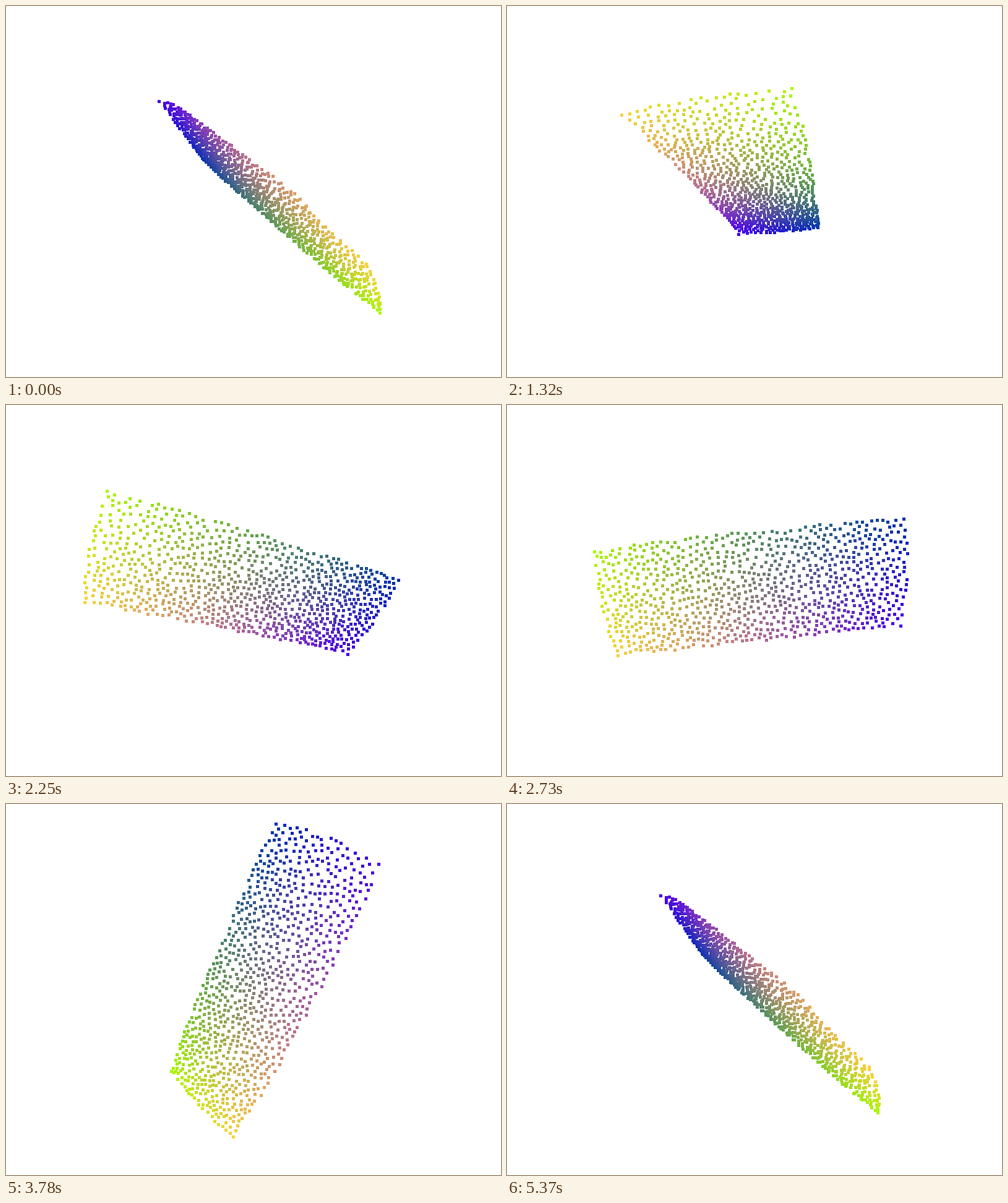
These frames come from a looping animation (800 by 600 pixels, 5400 ms). An HTML page with a canvas:

```html
<!DOCTYPE html>
<html lang="en">
<head>
<meta charset="utf-8">
<title>Turning point cloud</title>
<style>
  html, body { margin: 0; width: 100%; height: 100%; overflow: hidden; background: #fff; }
  canvas { display: block; }
</style>
</head>
<body>
<canvas id="stage" width="800" height="600"></canvas>
<script>
const ctx = document.getElementById('stage').getContext('2d');

const STEP = 30, STEPS = 180;      // 2 degrees every 30 ms
const COUNT = 900, GAP = 7.4, SIZE = 5;
const DIST = 565;                  // camera distance
const TILT = 47.3 * Math.PI / 180; // turning axis against the line of sight
const ROLL = 34.6 * Math.PI / 180; // turning axis within the picture
const HALF_LONG = 240, HALF_SHORT = 89;

// Directions of the sheet: long side, short side, normal
const LONG = [-0.774, -0.414, -0.479];
const SHORT = [-0.594, 0.728, 0.342];
const NORMAL = [0.207, 0.549, -0.809];

// Corner colours
const LIME = [172, 248, 4], YELLOW = [247, 210, 62];
const BLUE = [0, 48, 178], VIOLET = [70, 0, 236];

let seed = 20117;
function random() {
  seed = (seed + 0x6D2B79F5) | 0;
  let r = Math.imul(seed ^ (seed >>> 15), 1 | seed);
  r = (r + Math.imul(r ^ (r >>> 7), 61 | r)) ^ r;
  return ((r ^ (r >>> 14)) >>> 0) / 4294967296;
}

const mix = (p, q, k) => p + (q - p) * k;

function smooth(lo, hi, x) {
  const k = Math.min(1, Math.max(0, (x - lo) / (hi - lo)));
  return k * k * (3 - 2 * k);
}

// a runs along the long side, b along the short side, both from -1 to 1
function place(a, b) {
  const side = (1 + b) / 2;
  const s = a * (HALF_LONG + 10 * (1 - b * b));
  const t = b * (HALF_SHORT + 6.5 * (1 - a ** 4));
  const hump = 13 * (1 - a ** 8) * mix(0.35, 1, smooth(-0.75, -0.48, a));
  const lift = mix(-4 * (1 - a ** 4), hump, side);
  return LONG.map((d, i) => d * s + SHORT[i] * t + NORMAL[i] * lift);
}

function tint(a, b) {
  const along = (1 + a) / 2, side = (1 + b) / 2;
  const rgb = LIME.map((_, i) =>
    mix(mix(LIME[i], BLUE[i], along), mix(YELLOW[i], VIOLET[i], along), side));
  rgb[0] += 20 * (1 - a * a) * side;
  return `rgb(${rgb.map(Math.round).join(',')})`;
}

function scatter() {
  const spots = [[-1, -1], [-1, 1], [1, -1], [1, 1]];
  for (let tries = 0; spots.length < COUNT && tries < 40000; tries++) {
    const a = random() * 2 - 1, b = random() * 2 - 1;
    const free = spots.every(([c, d]) =>
      Math.hypot((a - c) * (HALF_LONG + 7), (b - d) * (HALF_SHORT + 5)) > GAP);
    if (free) spots.push([a, b]);
  }
  return spots.map(([a, b]) => ({ pos: place(a, b), color: tint(a, b) }));
}

const points = scatter();
const sinT = Math.sin(TILT), cosT = Math.cos(TILT);
const sinR = Math.sin(ROLL), cosR = Math.cos(ROLL);

function project({ pos: [x, y, z], color }, sin, cos) {
  const p = x * cos - y * sin;
  const turned = x * sin + y * cos;
  const q = z * sinT - turned * cosT;
  const near = z * cosT + turned * sinT;
  const scale = DIST / (DIST - near);
  return {
    color, near,
    x: 400 + scale * (p * cosR - q * sinR),
    y: 300 + scale * (p * sinR + q * cosR)
  };
}

function draw(time) {
  const step = Math.floor(time / STEP) % STEPS;
  const angle = step / STEPS * 2 * Math.PI;
  const sin = Math.sin(angle), cos = Math.cos(angle);
  ctx.fillStyle = '#fff';
  ctx.fillRect(0, 0, 800, 600);
  const dots = points.map(p => project(p, sin, cos)).sort((m, n) => m.near - n.near);
  for (const d of dots) {
    ctx.fillStyle = d.color;
    ctx.fillRect(Math.round(d.x - SIZE / 2), Math.round(d.y - SIZE / 2), SIZE, SIZE);
  }
}

function tick() {
  draw(performance.now());
  requestAnimationFrame(tick);
}
tick();
</script>
</body>
</html>
```
